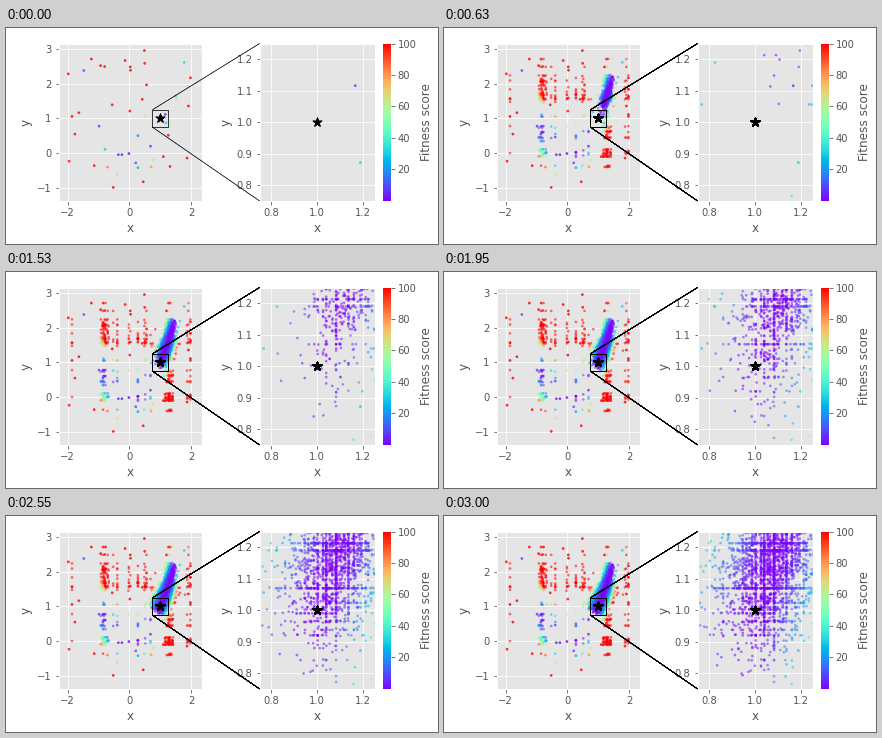
Write a matplotlib script that moves like this. It is 432 px wide and 216 px high and loops after 3030 ms.

```python
import matplotlib.pyplot as plt
import numpy as np
from matplotlib.animation import FuncAnimation
from matplotlib.collections import LineCollection

W, H, DPI = 432, 216, 72
GENS, STEP = 101, 30
TOP, BOTTOM = 15.55, 172.9
ZOOM = (0.75, 1.25)

rng = np.random.default_rng(7)


def rosenbrock(x, y):
    return 100 * (y - x**2)**2 + (1 - x)**2


def gene_pool(centres, spread, wild, size=70):
    """Genes gathered around the centres, with a share of wild ones."""
    genes = rng.normal(rng.choice(centres, size), spread)
    return np.where(rng.random(size) < 0.25, rng.choice(wild, size), genes)


def snap(values, marks, reach, chance):
    near = marks[np.abs(values[:, None] - marks).argmin(axis=1)]
    hit = (np.abs(near - values) < reach) & (rng.random(len(values)) < chance)
    return np.where(hit, near, values)


first = np.vstack([rng.uniform((-2, -1), (2, 3), (45, 2)), (1.166, 1.116)])
x_pool = gene_pool([-.8, 1.3], .08, first[:, 0])
y_pool = gene_pool([1.7, 1.7, 2.1, .6, 0], .13, first[:, 1])

# genes shared by many late individuals: a few dominant, the rest random
top_cols, top_rows = np.array([1.04, 1.083]), np.array([1.07, 1.19, 1.213])
cols, rows = rng.normal(1.07, .11, (2, 24))


def scattered(g):
    """Early crossover: any x meets any y."""
    n = int(27 * np.exp(-(g / 22)**6)) + g % 2
    return np.column_stack([rng.choice(x_pool, n), rng.choice(y_pool, n)])


def converging(g):
    """A cloud in the valley that slides down towards the optimum."""
    n = int(58 * min(1, g / 30))
    far = np.exp(-max(g - 21, 0) / 28)
    y = rng.normal(1.07 + .6 * far, .11 + .11 * far, n)
    y = y[(y > .76) & (y < 2.28)]
    follow = .2 + .5 * far
    x = (1 - follow) * (1.02 + .28 * far) + follow * np.sqrt(y)
    x += (.085 - .02 * far) * rng.standard_t(5, len(y))
    x = snap(snap(x, cols, .012, .6), top_cols, .03, .4)
    y = snap(snap(y, rows, .012, .6), top_rows, .03, .4)
    return np.column_stack([x, y])


broods = [np.vstack([first, first])]
broods += [np.vstack([scattered(g), converging(g)]) for g in range(1, GENS)]
points = np.vstack(broods)
birth = np.repeat(np.arange(GENS), [len(b) for b in broods])
score = rosenbrock(*points.T)
inside = (np.abs(points - 1) < 0.26).all(axis=1)

plt.style.use("ggplot")
fig = plt.figure(figsize=(W / DPI, H / DPI), dpi=DPI, facecolor="white")


def add_axes(x0, x1):
    return fig.add_axes([x0 / W, 1 - BOTTOM / H, (x1 - x0) / W,
                         (BOTTOM - TOP) / H])


def add_dots(ax):
    return ax.scatter([], [], c=[], s=7, lw=0, alpha=.55, cmap="rainbow",
                      vmin=0, vmax=100, zorder=2)


def add_star(ax):
    return ax.scatter([], [], s=90, marker="*", c="black", lw=.8, zorder=5)


wide, near = add_axes(52.6, 195.6), add_axes(253.5, 368.5)
wide.set(xlim=(-2.292, 2.344), ylim=(-1.374, 3.158), xticks=[-2, 0, 2],
         yticks=range(-1, 4), xlabel="x", ylabel="y")
near.set(xlim=ZOOM, ylim=ZOOM, xticks=[.8, 1, 1.2],
         yticks=[.8, .9, 1, 1.1, 1.2], xlabel="x", ylabel="y")

views = [(add_dots(wide), points, score, birth),
         (add_dots(near), points[inside], score[inside], birth[inside])]
stars = [add_star(wide), add_star(near)]

bar_map = plt.cm.ScalarMappable(plt.Normalize(0, 100), "rainbow")
bar = fig.colorbar(bar_map, cax=add_axes(377, 384.6),
                   ticks=range(20, 101, 20), label="Fitness score")
bar.outline.set_visible(False)
bar.ax.grid(False)

# zoom frame and its two connectors, in the coordinates of the wide plot
lo, hi = ZOOM
to_wide = wide.transData.inverted().transform
corners = to_wide(near.transAxes.transform([(0, 1), (0, 0)]))
marks = [[(lo, lo), (hi, lo), (hi, hi), (lo, hi), (lo, lo)],
         [(lo, hi), tuple(corners[0])], [(lo, lo), tuple(corners[1])]]
links = LineCollection([], colors="black", linewidths=.5,
                       transform=wide.transData, clip_on=False, zorder=4)
fig.add_artist(links)


def draw(g):
    for dots, xy, c, born in views:
        n = np.searchsorted(born, g, side="right")
        dots.set_offsets(xy[:n])
        dots.set_array(c[:n])
    # overlays pile up, so their soft edges darken
    layers = min(g + 2, 24)
    links.set_segments(marks * layers)
    for star in stars:
        star.set_offsets([(1, 1)] * layers)
    return [v[0] for v in views] + stars + [links]


anim = FuncAnimation(fig, draw, frames=GENS, interval=STEP, repeat=True,
                     init_func=lambda: draw(0), blit=False)
plt.show()
```
